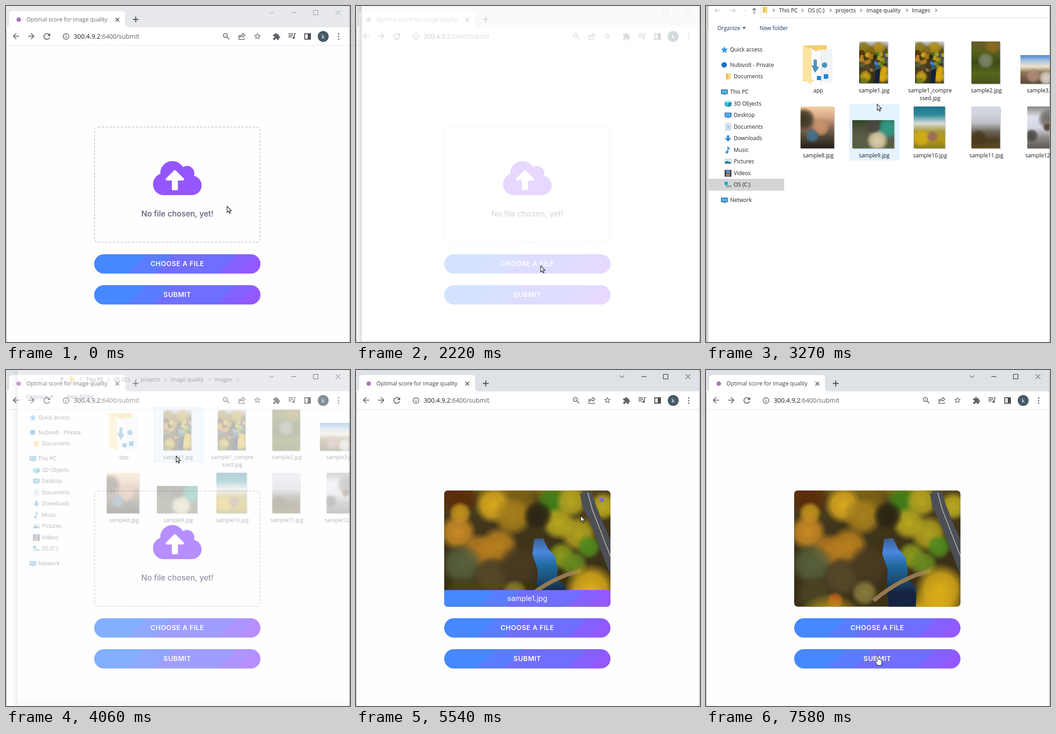
An HTML page with a canvas that plays this animation: 757 by 739 pixels, repeating every 8000 ms.

```html
<!DOCTYPE html>
<html lang="en">
<head>
<meta charset="utf-8">
<title>Optimal score for image quality</title>
<style>
html, body { margin: 0; width: 100%; height: 100%; overflow: hidden; background: #fff; }
canvas { display: block; }
</style>
</head>
<body>
<canvas id="stage" width="757" height="739"></canvas>
<script>
const W = 757, H = 739, LOOP = 8000, PAD = 20;
const SANS = '"Open Sans", "Noto Sans", sans-serif';
const ROUND = 'Inter, "Open Sans", sans-serif';
const screen = document.getElementById('stage').getContext('2d');
const sheet = document.createElement('canvas');
sheet.width = 820;
sheet.height = 800;
const layer = sheet.getContext('2d');
let g = screen;

// ---------- helpers ----------
function rect(x, y, w, h, fill) {
  g.fillStyle = fill;
  g.fillRect(x, y, w, h);
}
function roundPath(x, y, w, h, r) {
  g.beginPath();
  g.roundRect(x, y, w, h, r);
}
function disc(x, y, r, fill) {
  g.fillStyle = fill;
  g.beginPath();
  g.arc(x, y, r, 0, 7);
  g.fill();
}
function line(points, color, width = 1) {
  g.strokeStyle = color;
  g.lineWidth = width;
  g.beginPath();
  for (let i = 0; i < points.length; i += 2) g.lineTo(points[i], points[i + 1]);
  g.stroke();
}
function shape(points, fill) {
  g.fillStyle = fill;
  g.beginPath();
  for (let i = 0; i < points.length; i += 2) g.lineTo(points[i], points[i + 1]);
  g.fill();
}
function icon(d, x, y, scale, fill, stroke) {
  const path = new Path2D(d);
  g.save();
  g.translate(x, y);
  g.scale(scale, scale);
  if (fill) {
    g.fillStyle = fill;
    g.fill(path, 'evenodd');
  }
  if (stroke) {
    g.strokeStyle = stroke;
    g.stroke(path);
  }
  g.restore();
}
// y is the middle of the line
function text(str, x, y, size, color, { font = SANS, weight = 400, align = 'left', gap = 0 } = {}) {
  g.font = `${weight} ${size}px ${font}`;
  g.fillStyle = color;
  g.textAlign = align;
  g.letterSpacing = gap + 'px';
  g.fillText(str, x, y + size * 0.36);
}
function ramp(y0, y1, colors) {
  const grad = g.createLinearGradient(0, y0, 0, y1);
  colors.forEach((c, i) => grad.addColorStop(i / (colors.length - 1), c));
  return grad;
}
// diagonal bands from blue to purple: [end, color]
const BANDS = [[0.28, '#4688ff'], [0.425, '#5a7dff'], [0.77, '#706eff'], [0.875, '#8560ff'], [1, '#9458ff']];
function diagonal(x, y, w, h) {
  const cx = x + w / 2, cy = y + h / 2, k = (w + h) / 4;
  const grad = g.createLinearGradient(cx - k, cy - k, cx + k, cy + k);
  let from = 0;
  for (const [end, color] of BANDS) {
    grad.addColorStop(from, color);
    grad.addColorStop(end, color);
    from = end;
  }
  return grad;
}
function blob(x, y, r, color) {
  const grad = g.createRadialGradient(x, y, 0, x, y, r);
  grad.addColorStop(0, color);
  grad.addColorStop(0.6, color + 'd0');
  grad.addColorStop(1, color + '00');
  disc(x, y, r, grad);
}

// ---------- icon paths ----------
const ICON = {
  back: 'M20 11H7.83l5.59-5.59L12 4l-8 8 8 8 1.41-1.41L7.83 13H20v-2z',
  reload: 'M17.65 6.35C16.2 4.9 14.21 4 12 4c-4.42 0-7.99 3.58-7.99 8s3.57 8 7.99 8c3.73 0 6.84-2.55 7.73-6h-2.08c-.82 2.33-3.04 4-5.65 4-3.31 0-6-2.69-6-6s2.69-6 6-6c1.66 0 3.14.69 4.22 1.78L13 11h7V4l-2.35 2.35z',
  zoom: 'M15.5 14h-.79l-.28-.27C15.41 12.59 16 11.11 16 9.5 16 5.91 13.09 3 9.5 3S3 5.91 3 9.5 5.91 16 9.5 16c1.61 0 3.09-.59 4.23-1.57l.27.28v.79l5 4.99L20.49 19l-4.99-5zm-6 0C7.01 14 5 11.99 5 9.5S7.01 5 9.5 5 14 7.01 14 9.5 11.99 14 9.5 14zM7 9h5v1H7z',
  star: 'M22 9.24l-7.19-.62L12 2 9.19 8.63 2 9.24l5.46 4.73L5.82 21 12 17.27 18.18 21l-1.63-7.03L22 9.24zM12 15.4l-3.76 2.27 1-4.28-3.32-2.88 4.38-.38L12 6.1l1.71 4.04 4.38.38-3.32 2.88 1 4.28L12 15.4z',
  puzzle: 'M20.5 11H19V7c0-1.1-.9-2-2-2h-4V3.5C13 2.12 11.88 1 10.5 1S8 2.12 8 3.5V5H4c-1.1 0-1.99.9-1.99 2v3.8H3.5c1.49 0 2.7 1.21 2.7 2.7s-1.21 2.7-2.7 2.7H2V20c0 1.1.9 2 2 2h3.8v-1.5c0-1.49 1.21-2.7 2.7-2.7 1.49 0 2.7 1.21 2.7 2.7V22H17c1.1 0 2-.9 2-2v-4h1.5c1.38 0 2.5-1.12 2.5-2.5S21.88 11 20.5 11z',
  queue: 'M15 6H3v2h12V6zm0 4H3v2h12v-2zM3 16h8v-2H3v2zM17 6v8.18c-.31-.11-.65-.18-1-.18-1.66 0-3 1.34-3 3s1.34 3 3 3 3-1.34 3-3V8h3V6h-5z',
  cloud: 'M537.6 226.6c4.1-10.7 6.4-22.4 6.4-34.6 0-53-43-96-96-96-19.7 0-38.1 6-53.3 16.2C367 64.2 315.3 32 256 32c-88.4 0-160 71.6-160 160 0 2.7.1 5.4.2 8.1C40.2 219.8 0 273.2 0 336c0 79.5 64.5 144 144 144h368c70.7 0 128-57.3 128-128 0-61.9-44-113.6-102.4-125.4zM393.4 288H328v112c0 8.8-7.2 16-16 16h-48c-8.8 0-16-7.2-16-16V288h-65.4c-14.3 0-21.4-17.2-11.3-27.3l105.4-105.4c6.2-6.2 16.4-6.2 22.6 0l105.4 105.4c10.1 10.1 2.9 27.3-11.3 27.3z',
  arrow: 'M.5 .5V14L3.6 11.2L5.8 16L7.9 15L5.8 10.5H10Z',
  hand: 'M-1.8 1.8A1.8 1.8 0 0 1 1.8 1.8V7.5C3 6.5 4.6 7 4.8 8C6 7.3 7.4 8 7.4 9.2C8.6 9 9 9.8 9 10.8V15C9 17 7.5 18.5 7.5 20.5H-1.5C-1.8 18-5.5 15-5.8 12.2C-5.8 10.4-3.6 10.4-1.8 13Z'
};

// ---------- photos ----------
const TREES = [
  [60, 75, 85, '#8a7a1e'], [250, 80, 95, '#b08f1a'], [150, 110, 60, '#8a6a1c'], [30, 150, 50, '#5a2c0c'],
  [35, 190, 26, '#c0921c'], [170, 165, 36, '#7a5f14'], [108, 172, 42, '#dba91e'], [150, 197, 44, '#a8801c'],
  [30, 232, 42, '#c98a24'], [75, 272, 40, '#b57a20'], [120, 262, 44, '#b9801e'], [40, 302, 48, '#56603c'],
  [105, 330, 46, '#57482a'], [165, 305, 50, '#4a3a22'], [45, 366, 42, '#4a4424'], [90, 382, 20, '#b8541a'],
  [155, 365, 30, '#8a7a3c'], [238, 165, 36, '#3f7d18'], [280, 165, 36, '#b5a420'], [252, 212, 38, '#b8a81e'],
  [295, 235, 42, '#b0a01e'], [318, 264, 28, '#4f8a1c'], [258, 284, 32, '#8a9a1c'], [285, 302, 32, '#6a8a20'],
  [350, 175, 32, '#b8a81e'], [206, 195, 34, '#2a2414'],
  [80, 450, 85, '#c9a41a'], [300, 445, 95, '#e0b214'], [60, 510, 60, '#6b7a1a']
];
function valley(x, y, w) {
  g.save();
  g.translate(x, y);
  g.scale(w / 366, w / 366);
  g.beginPath();
  g.rect(0, 0, 366, 534);
  g.clip();
  rect(0, 0, 366, 534, ramp(0, 534, ['#d3d6ea', '#5e4f1a', '#41361a', '#3a3018', '#3a3216', '#3a3414']));
  TREES.forEach(b => blob(...b));
  shape([198, 247, 218, 245, 228, 267, 244, 285, 250, 315, 248, 335, 270, 355, 266, 420, 255, 534, 190, 534,
    208, 395, 204, 345, 206, 315, 194, 280], ramp(245, 395, ['#3a5f90', '#4a86e0', '#1f6aa0', '#1b4f78', '#14233f', '#14233f']));
  shape([299, 148, 304, 176, 326, 222, 350, 285, 366, 325, 366, 248, 350, 212, 334, 172, 324, 142, 308, 142], '#4c4f56');
  line([316, 145, 326, 182, 366, 285], '#c9c7b8', 1.5);
  g.beginPath();
  g.moveTo(175, 382);
  g.quadraticCurveTo(235, 332, 300, 316);
  g.lineWidth = 9;
  g.strokeStyle = '#957a50';
  g.stroke();
  blob(322, 358, 58, '#dcae18');
  g.restore();
}
function photo(x, y, w, h, colors, blobs = []) {
  g.save();
  g.beginPath();
  g.rect(x, y, w, h);
  g.clip();
  rect(x, y, w, h, ramp(y, y + h, colors));
  blobs.forEach(([bx, by, r, c]) => blob(x + bx * w, y + by * h, r * w, c));
  g.restore();
}

// ---------- browser ----------
function chrome(active) {
  const ink = '#5f6368', frame = active ? '#1a1a1a' : '#8d9094';
  rect(0, 0, W, H, '#fefefe');
  rect(0, 0, W, 47, active ? '#dee1e6' : '#e7e9ec');
  icon('M-1 47Q7 47 7 39V19Q7 11 15 11H254Q262 11 262 19V39Q262 47 270 47Z', 0, 0, 1, '#fff');
  disc(28, 30, 5, '#a878b8');
  text('Optimal score for image quality', 45, 30, 12.2, active ? '#3c4043' : '#6b6e73');
  line([241, 26, 249, 34], '#45484c', 1.6);
  line([249, 26, 241, 34], '#45484c', 1.6);
  line([279, 29.5, 292, 29.5], '#45484c', 2);
  line([285.5, 23, 285.5, 36], '#45484c', 2);
  line([580, 12, 585, 17, 590, 12], frame);
  line([628, 14.5, 639, 14.5], frame);
  g.strokeRect(676.5, 9.5, 10, 10);
  line([725, 9, 736, 20], frame);
  line([736, 9, 725, 20], frame);

  rect(0, 47, W, 39, '#fff');
  rect(0, 86, W, 1, '#dfe1e4');
  icon(ICON.back, 11.5, 56, 0.87, ink);
  g.save();
  g.translate(66, 56);
  g.scale(-1, 1);
  icon(ICON.back, 0, 0, 0.87, ink);
  g.restore();
  icon(ICON.reload, 79, 56, 0.91, ink);
  g.lineWidth = 1.5;
  g.strokeStyle = ink;
  g.beginPath();
  g.arc(132, 67, 6.3, 0, 7);
  g.stroke();
  rect(131.2, 66, 1.6, 4.5, ink);
  rect(131.2, 63, 1.6, 1.7, ink);
  const host = '300.4.9.2';
  text(host, 149, 67, 13.9, '#202124');
  text(':6400/submit', 149 + g.measureText(host).width, 67, 13.9, '#5f6368');
  icon(ICON.zoom, 475, 57, 0.82, ink);
  line([515, 65, 512.5, 65, 512.5, 73.5, 524.5, 73.5, 524.5, 71], ink, 1.4);
  icon('M0 9Q1 3 7 3V0L12 4.7L7 9V6.3Q3 6.3 0 9Z', 514.5, 60, 0.95, null, ink);
  icon(ICON.star, 544.5, 57.5, 0.73, ink);
  icon(ICON.puzzle, 586.5, 58.5, 0.74, ink);
  icon(ICON.queue, 619, 55, 0.87, ink);
  g.strokeStyle = '#4a4d52';
  g.lineWidth = 2;
  g.strokeRect(657.5, 61, 12.5, 12);
  rect(664, 60, 7, 14, '#4a4d52');
  disc(698, 67, 12, '#455a64');
  text('k', 698, 67, 13, '#fff', { align: 'center' });
  [61.5, 67, 72.5].forEach(y => disc(732, y, 1.6, ink));
}
function button(y, label) {
  roundPath(194, y, 366, 42.5, 21.2);
  g.fillStyle = diagonal(194, y, 366, 42);
  g.fill();
  text(label, 377, y + 21, 14.8, '#fff', { font: ROUND, weight: 600, align: 'center', gap: 0.5 });
}
function page(loaded, hover) {
  if (loaded) {
    g.save();
    roundPath(194, 265, 366, 255.5, 8);
    g.clip();
    valley(194, 125, 366);
    if (hover) {
      rect(194, 484, 366, 37, diagonal(194, 484, 366, 36));
      text('sample1.jpg', 377, 502.5, 15.9, '#fff', { font: ROUND, align: 'center' });
      line([536.5, 281.5, 545.5, 290.5], '#7a5cff', 3);
      line([545.5, 281.5, 536.5, 290.5], '#7a5cff', 3);
    }
    g.restore();
  } else {
    g.setLineDash([5, 3.3]);
    roundPath(194.9, 266.2, 364.2, 253.4, 8);
    g.strokeStyle = '#c2c9da';
    g.lineWidth = 1.7;
    g.stroke();
    g.setLineDash([]);
    icon(ICON.cloud, 323.5, 335.7, 107 / 640, '#9457ff');
    text('No file chosen, yet!', 377, 457, 17.2, '#5b5b7b', { font: ROUND, weight: 500, align: 'center' });
  }
  button(546, 'CHOOSE A FILE');
  button(614, 'SUBMIT');
  rect(0, 48, 1, H, '#a2a4a7');
  rect(755, 0, 1, H, '#b0b2b5');
  rect(756, 0, 1, H, '#e9eaec');
}

// ---------- file dialog ----------
const BLUE = '#2f8fd8';
const GLYPH = {
  star: (x, y) => icon('M8 0l2.3 5.4 5.7.5-4.3 3.8 1.3 5.8L8 12.5 3 15.5l1.3-5.8L0 5.9l5.7-.5z', x, y, 0.95, '#2f96e0'),
  disc: (x, y) => disc(x + 7, y + 7, 6, '#1273cc'),
  folder: (x, y) => { rect(x + 3, y + 1, 10, 13, '#f5d678'); rect(x + 3, y + 1, 4, 13, '#e9bd4f'); },
  screen: (x, y) => { rect(x, y + 2, 15, 10, '#2a6fa8'); rect(x + 1.5, y + 3.5, 12, 7, '#4fb4ea'); rect(x + 5, y + 12, 6, 2, '#8a96a0'); },
  cube: (x, y) => { shape([x, y + 3, x + 8, y, x + 15, y + 3, x + 8, y + 6], '#8fe3f2'); shape([x, y + 3, x + 8, y + 6, x + 8, y + 15, x, y + 12], '#35b8d4'); shape([x + 8, y + 6, x + 15, y + 3, x + 15, y + 12, x + 8, y + 15], '#1a8fb5'); },
  page: (x, y) => { rect(x + 2, y, 12, 15, '#8fa3b5'); rect(x + 3, y + 1, 10, 13, '#fff'); [4, 7, 10].forEach(k => rect(x + 5, y + k, 6, 1.3, BLUE)); },
  down: (x, y) => shape([x + 5, y + 1, x + 10, y + 1, x + 10, y + 7, x + 15, y + 7, x + 7.5, y + 15, x, y + 7, x + 5, y + 7], '#3d88d0'),
  note: (x, y) => { disc(x + 5, y + 12, 3, BLUE); line([x + 7.2, y + 12, x + 7.2, y + 1, x + 11.5, y + 6], BLUE, 2); },
  picture: (x, y) => { rect(x, y + 2, 15, 11, '#a9b4bd'); rect(x + 1, y + 3, 13, 9, '#d8effc'); shape([x + 1, y + 12, x + 1, y + 8, x + 6, y + 6, x + 14, y + 10, x + 14, y + 12], '#2f78a8'); },
  film: (x, y) => { rect(x, y, 15, 15, '#3b3f46'); rect(x + 3, y + 1, 9, 6, '#5b8fd0'); rect(x + 3, y + 8, 9, 6, '#b07a50'); },
  drive: (x, y) => { rect(x, y + 1, 7, 7, '#18a5e0'); rect(x + 2, y + 9, 13, 4, '#9aa2a8'); rect(x + 10, y + 10, 4, 1.5, '#49d05a'); }
};
const SIDE = [
  [96, 0, 'star', 'Quick access'], [130, 0, 'disc', 'Nubivolt - Private'], [155, 1, 'folder', 'Documents'],
  [189, 0, 'screen', 'This PC'], [215, 1, 'cube', '3D Objects'], [240, 1, 'screen', 'Desktop'],
  [266, 1, 'page', 'Documents'], [291, 1, 'down', 'Downloads'], [317, 1, 'note', 'Music'],
  [342, 1, 'picture', 'Pictures'], [368, 1, 'film', 'Videos'], [393, 1, 'drive', 'OS (C:)'], [427, 0, 'screen', 'Network']
];
const CRUMBS = [[161, 'This PC', 149], [224, 'OS (C:)', 212], [285, 'projects', 274], [353, 'image quality', 341], [453, 'Images', 442]];
const PHOTOS = [
  [584, 78, 63, 93, ['#6b5a2a', '#56601c', '#3c4a18', '#56661a', '#46521a'], [[0.5, 0.45, 0.3, '#7c8468'], [0.75, 0.1, 0.3, '#8a6a20']]],
  [692, 108, 94, 63, ['#4f86cc', '#a9c4e4', '#f0e2cc', '#8a7a50', '#7a5a48', '#54503c'], [[0.3, 0.72, 0.18, '#b08a78'], [0.6, 0.8, 0.18, '#d8d0c8']]],
  [208, 221, 74, 92, ['#f3cfa4', '#d8a888', '#8a6a58', '#4a4434', '#241f18'], [[0.6, 0.5, 0.28, '#c9926a'], [0.1, 0.3, 0.35, '#3a3420'], [0.35, 0.7, 0.22, '#44708a']]],
  [322, 251, 92, 62, ['#34462a', '#50543e', '#5c5c48', '#54603c'], [[0.85, 0.28, 0.28, '#2f9a86'], [0.6, 0.72, 0.27, '#dccfa8'], [0.5, 0.2, 0.2, '#4a4640']]],
  [457, 221, 69, 92, ['#1f7488', '#2f8a9a', '#d9dcd8', '#a8973a', '#b59a18', '#8a7c1c'], [[0.25, 0.75, 0.3, '#d0ac14'], [0.6, 0.72, 0.2, '#9a6a5a']]],
  [584, 221, 63, 92, ['#d4d6e2', '#d0d2dc', '#bfc0c6', '#6a6458', '#4c3c20', '#5a4a22'], [[0.25, 0.75, 0.3, '#4a3a1a']]],
  [707, 221, 63, 92, ['#8a8682', '#dfe2ec', '#d5d8e4', '#8a8684', '#5c5854'], [[0.75, 0.3, 0.4, '#6e6a66'], [0.15, 0.7, 0.25, '#4c4a46'], [0.7, 0.5, 0.16, '#5a4030']]]
];
const LABELS = [
  [247, 186, 'app'], [370, 186, 'sample1.jpg'], [493, 186, 'sample1_compre'], [493, 203, 'ssed.jpg'],
  [617, 186, 'sample2.jpg'], [740, 186, 'sample3.jpg'], [247, 329, 'sample8.jpg'], [370, 329, 'sample9.jpg'],
  [493, 329, 'sample10.jpg'], [617, 329, 'sample11.jpg'], [740, 329, 'sample12.jpg']
];
function chevron(x, y) {
  line([x - 1.5, y - 3.5, x + 2, y, x - 1.5, y + 3.5], '#666', 1.1);
}
function pointer(x, y, dx, dy, color) {
  line([x - dx * 6, y - dy * 6, x + dx * 6, y + dy * 6], color, 1.4);
  line([x + dx * 2 + dy * 4, y + dy * 2 + dx * 4, x + dx * 6, y + dy * 6, x + dx * 2 - dy * 4, y + dy * 2 - dx * 4], color, 1.4);
}
function appFolder() {
  shape([213, 87, 266, 86, 266, 165, 213, 165], '#f3cf6c');
  shape([244, 97, 278, 95, 278, 168, 250, 168], '#f1f3f5');
  disc(261, 130, 6, '#4a94b8');
  rect(259, 150, 10, 10, '#1e88d0');
  shape([228, 92, 250, 103, 254, 108, 254, 172, 228, 160], '#fbfbfb');
  line([254, 108, 254, 172], '#c8ccd0');
  shape([237, 117, 244, 119, 244, 133, 249, 134, 240, 147, 232, 130, 237, 131], '#4a94b8');
  rect(244, 154, 9, 9, '#1e88d0');
  shape([213, 87, 232, 97, 232, 173, 213, 161], '#fbe3a0');
}
function files(state) {
  if (state === 'beach') rect(315, 215, 111, 125, '#e5f3ff');
  if (state === 'valley' || state === 'picked') rect(315, 72, 111, 125, '#e5f3ff');
  if (state === 'picked') {
    g.strokeStyle = '#99d1ff';
    g.lineWidth = 1;
    g.strokeRect(315.5, 72.5, 110, 124);
  }
  appFolder();
  const shadow = (x, y, w, h) => rect(x + 2, y + 2, w, h, 'rgba(0,0,0,.18)');
  [337, 460].forEach(x => {
    shadow(x, 78, 63, 92);
    valley(x, 78, 63);
  });
  PHOTOS.forEach(p => {
    shadow(...p.slice(0, 4));
    photo(...p);
  });
  LABELS.forEach(([x, y, s]) => text(s, x, y, 12, '#1c1c1c', { align: 'center' }));
}
function dialogContent(state) {
  pointer(26, 10, -1, 0, '#c4c4c4');
  pointer(58, 10, 1, 0, '#c4c4c4');
  line([81.5, 8.5, 84.5, 11.5, 87.5, 8.5], '#c4c4c4');
  pointer(106, 11, 0, -1, '#5a5a5a');
  line([120.5, -2, 120.5, 25.5, 820, 25.5], '#d9d9d9');
  GLYPH.folder(122, 1);
  CRUMBS.forEach(([x, s, cx]) => {
    chevron(cx, 9.5);
    text(s, x, 10, 12, '#222');
  });
  chevron(506, 9.5);
  text('Organize', 25, 49, 12, '#1a3a63');
  shape([80, 46.5, 87.5, 46.5, 83.75, 50.5], '#1a3a63');
  text('New folder', 118, 49, 12.2, '#1a3a63');
  // the sidebar loses its highlight once a file is picked
  if (state !== 'picked') rect(6, 380, 166, 26, '#d4d4d4');
  SIDE.forEach(([y, deep, kind, s]) => {
    GLYPH[kind](33 + deep * 8, y - 7.5);
    text(s, 53 + deep * 8, y, 12, '#222');
  });
  files(state);
}
function dialog(alpha, scale, filled, state) {
  g = layer;
  g.setTransform(1, 0, 0, 1, PAD, PAD);
  g.clearRect(-PAD, -PAD, 820, 800);
  const shade = g.createLinearGradient(-8, 0, 5, 0);
  shade.addColorStop(0, 'rgba(0,0,0,0)');
  shade.addColorStop(1, 'rgba(0,0,0,.16)');
  rect(-8, -PAD, 13, 800, shade);
  rect(5, -PAD, 800, 800, '#fff');
  rect(5, 739, 800, 60, '#f0f0f0');
  rect(4, -PAD, 1, 800, '#b4b4b4');
  if (filled) dialogContent(state);
  g = screen;
  g.save();
  g.globalAlpha = alpha;
  g.translate(649, 383);
  g.scale(scale, scale);
  g.drawImage(sheet, -649 - PAD, -383 - PAD);
  g.restore();
  rect(756, 0, 1, H, '#a8a8a8');
}

// ---------- timing ----------
// start, end, steps, ease-out power, path
const MOVES = [
  [760, 1340, 8, 1, [[486, 440], [406, 571]]],
  [2910, 3630, 9, 3.3, [[406, 571], [374, 189]]],
  [5060, 5820, 10, 1, [[374, 189], [414, 233], [454, 277], [494, 320], [510, 312], [525, 305]]],
  [5890, 6600, 10, 1, [[525, 305], [541, 286], [541, 288], [485, 385], [429, 469]]],
  [6700, 7020, 5, 1, [[429, 469], [409, 491]]],
  [7360, 7580, 4, 1, [[409, 491], [377, 629]]]
];
// time, opacity, scale
const FADE = [
  [0, 0, 1], [2130, 0.35, 0.975], [2220, 0.77, 0.989], [2300, 0.93, 0.996], [2370, 1, 0.999],
  [2450, 1, 1], [3970, 0.75, 0.985], [4060, 0.33, 0.9696], [4160, 0, 1]
];
function cursorAt(t) {
  const [t0, t1, n, pow, path] = MOVES.findLast(m => t >= m[0]) || MOVES[0];
  const k = t < t0 ? 0 : Math.min(n, 1 + Math.floor((t - t0) / (t1 - t0) * (n - 1) + 1e-6));
  const p = (1 - (1 - k / n) ** pow) * (path.length - 1);
  const i = Math.min(path.length - 2, Math.floor(p)), f = p - i;
  return [0, 1].map(a => path[i][a] + (path[i + 1][a] - path[i][a]) * f);
}
const inside = (x, y, l, t, r, b) => x >= l && x <= r && y >= t && y <= b;

function draw(t) {
  const [x, y] = cursorAt(t);
  const [, alpha, scale] = FADE.findLast(s => t >= s[0]);
  const loaded = t >= 4450;
  const hover = loaded && inside(x, y, 194, 265, 560, 520);
  const open = t >= 2130 && t < 4160;
  chrome(t >= 1810 && !(t >= 2130 && t < 3970));
  page(loaded, hover);
  if (alpha) {
    const state = t >= 3810 ? 'picked'
      : inside(x, y, 315, 72, 426, 197) ? 'valley'
      : inside(x, y, 315, 212, 426, 340) ? 'beach' : '';
    dialog(alpha, scale, t >= 2450, state);
  }
  const link = !open && (inside(x, y, 194, 546, 560, 588) || inside(x, y, 194, 614, 560, 656) ||
    (hover && inside(x, y, 535, 280, 547, 292)));
  g.lineWidth = 1.1;
  icon(link ? ICON.hand : ICON.arrow, link ? x + 1 : x, y, 1, '#fff', '#111');
}
function tick() {
  draw(performance.now() % LOOP);
  requestAnimationFrame(tick);
}
tick();
</script>
</body>
</html>
```
